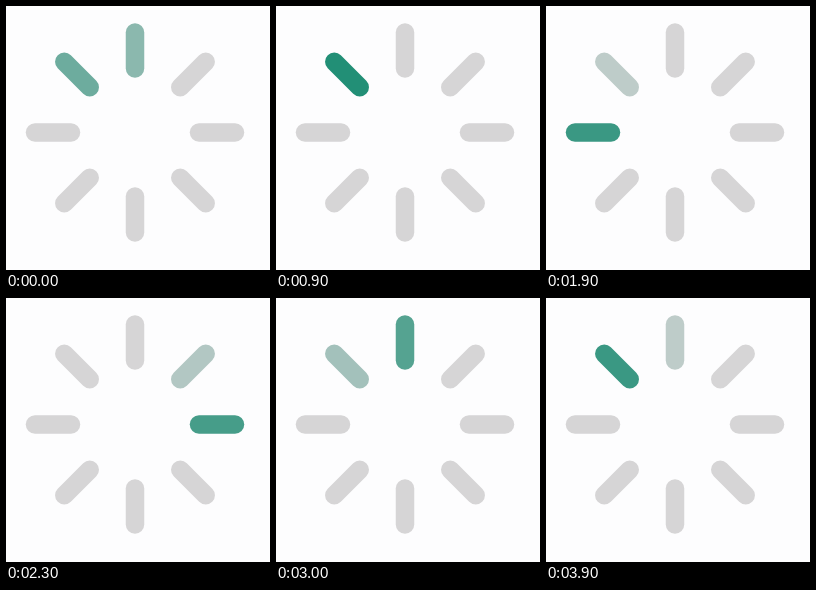
An HTML page that plays this animation: 264x264 px, repeating every 4000 ms.

```html
<!DOCTYPE html>
<html lang="en">
<head>
<meta charset="utf-8">
<title>Spinner</title>
<style>
html, body { margin: 0; width: 100%; height: 100%; overflow: hidden; background: #fdfdfe; }
svg { display: block; width: 100vw; height: 100vh; }
line { stroke-width: 18.5; stroke-linecap: round; }
</style>
</head>
<body>
<svg viewBox="0 0 264 264"><g id="bars" transform="translate(129 126.5)"></g></svg>
<script>
const LOOP = 4000, STEP = 100, COUNT = 8;
const HOLD = 0.4; // share of each bar's turn spent fully lit before the crossfade
const GREY = [214, 213, 214], GREEN = [34, 143, 118];
// [step, bars travelled clockwise from the top]
const PACE = [[0, 7.65], [9, 15.08], [19, 22.48], [39, 39.48]];

const group = document.getElementById('bars');
const bars = Array.from({ length: COUNT }, (_, i) => {
  const bar = document.createElementNS('http://www.w3.org/2000/svg', 'line');
  bar.setAttribute('y1', -64);
  bar.setAttribute('y2', -100);
  bar.setAttribute('transform', `rotate(${i * 360 / COUNT})`);
  return group.appendChild(bar);
});

function travel(step) {
  let i = 0;
  while (i < PACE.length - 2 && step > PACE[i + 1][0]) i++;
  const [a, from] = PACE[i], [b, to] = PACE[i + 1];
  return from + (to - from) * (step - a) / (b - a);
}

function mix(k) {
  return `rgb(${GREY.map((c, i) => Math.round(c + (GREEN[i] - c) * k))})`;
}

function draw(ms) {
  const pos = travel(Math.floor((ms % LOOP) / STEP));
  const lead = Math.floor(pos);
  const fade = Math.max(0, (pos - lead - HOLD) / (1 - HOLD));
  bars.forEach((bar, i) => {
    const lit = i === lead % COUNT ? 1 - fade : i === (lead + 1) % COUNT ? fade : 0;
    bar.setAttribute('stroke', mix(lit));
  });
}

const start = performance.now();
function tick() {
  draw(performance.now() - start);
  requestAnimationFrame(tick);
}
tick();
</script>
</body>
</html>
```
